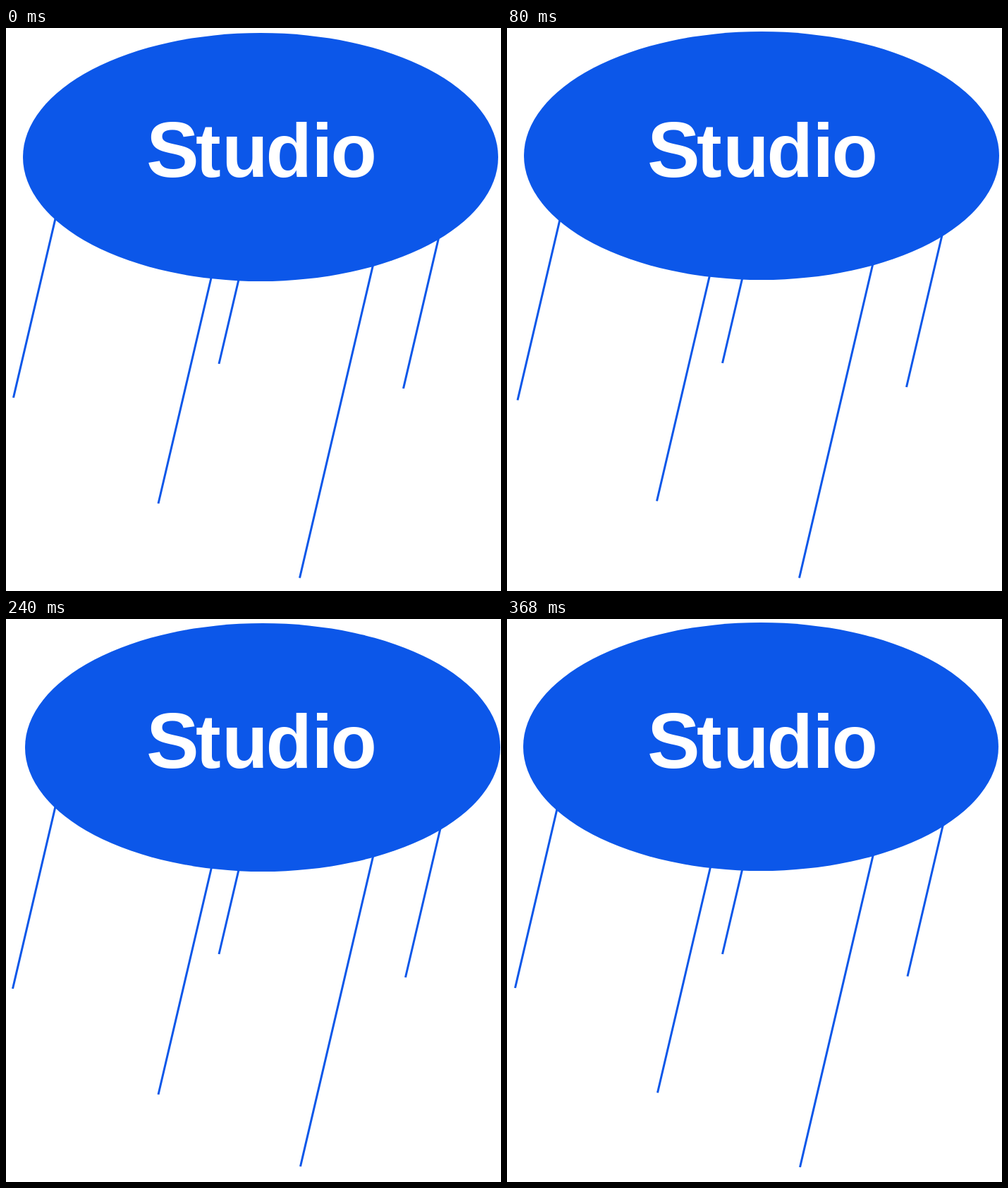
Animation of 702x798 px, one loop 0.4 s. Source, as an HTML page:

```html
<!DOCTYPE html>
<html lang="en">
<head>
<meta charset="utf-8">
<title>Studio</title>
<style>
  html, body { margin: 0; width: 100%; height: 100%; overflow: hidden; background: #fff; }
  svg { display: block; }
  text { font: bold 107px "Liberation Sans", Arial, sans-serif; fill: #fff; }
  .cap { font-size: 112px; }
</style>
</head>
<body>
<svg width="702" height="798" viewBox="0 0 702 798">
  <path id="strings" fill="none" stroke="#0c57e9" stroke-width="3"/>
  <ellipse id="balloon" rx="337" ry="176" fill="#0c57e9"/>
  <text x="199 269 306.3 368.6 433.5 460.6" y="211"><tspan class="cap">S</tspan>tudio</text>
</svg>
<script>
const STEP = 80;     // each pose holds this long, in ms
const SLANT = 0.2345; // sideways run of a string per pixel of height
const ANCHOR_Y = 240; // strings end out of sight behind the balloon

// Jittered poses: balloon centre, then the loose end of each string.
const poses = [
  { centre: [361, 183], ends: [[10.5, 524], [216, 674], [302, 476], [416.5, 779.5], [563.5, 511]] },
  { centre: [361, 181], ends: [[15, 527.5], [212.5, 670.5], [305.5, 475], [414.5, 779.5], [566.5, 509]] },
  { centre: [362, 182], ends: [[7.5, 524], [217, 675], [303, 473], [415.5, 782.5], [565.5, 509]] },
  { centre: [364, 182], ends: [[9.5, 524], [216, 674], [302, 475], [417.5, 776], [566.5, 508]] },
  { centre: [360, 181], ends: [[11.5, 523], [213.5, 671.5], [305.5, 475], [415.5, 777], [568, 506.5]] },
];

const balloon = document.getElementById("balloon");
const strings = document.getElementById("strings");

const stringPath = ([x, y]) =>
  `M${x} ${y}L${x + (y - ANCHOR_Y) * SLANT} ${ANCHOR_Y}`;

function draw() {
  const { centre, ends } = poses[Math.floor(performance.now() / STEP) % poses.length];
  balloon.setAttribute("cx", centre[0]);
  balloon.setAttribute("cy", centre[1]);
  strings.setAttribute("d", ends.map(stringPath).join(""));
  requestAnimationFrame(draw);
}
draw();
</script>
</body>
</html>
```
